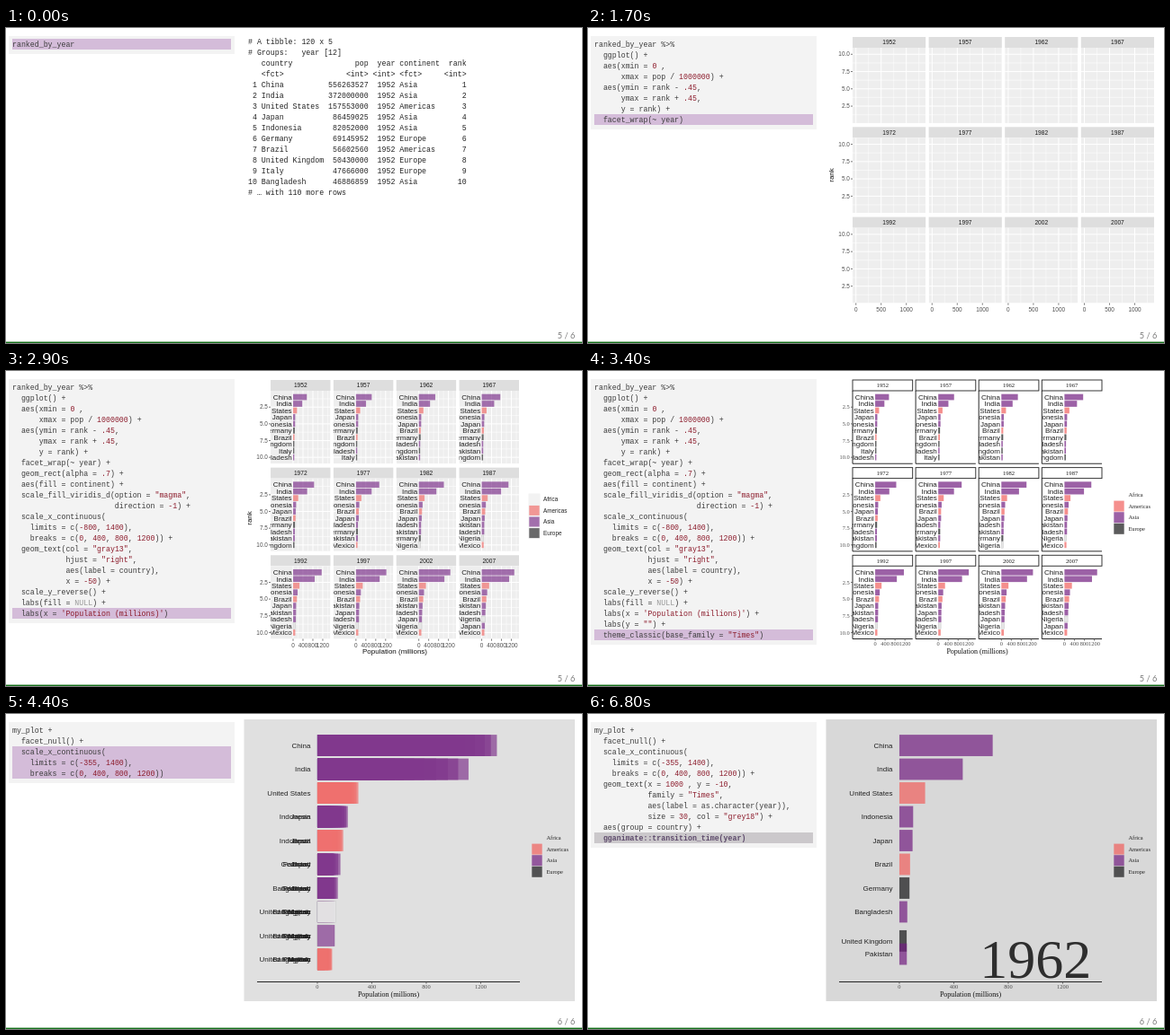
Write an HTML page that moves like this. It is 640 px wide and 351 px high and loops after 6900 ms.

```html
<!DOCTYPE html>
<html lang="en">
<head>
<meta charset="utf-8">
<title>Racing bar chart, step by step</title>
<style>
  html, body { margin: 0; width: 100%; height: 100%; overflow: hidden; background: #fff; }
  #stage { display: block; width: 640px; height: 351px; }
  text { white-space: pre; }
  .code { font: 8.25px "Liberation Mono", "DejaVu Sans Mono", monospace; fill: #3c3c3c; }
  .slide { font-family: Lato, "Open Sans", sans-serif; }
  .sans { font-family: "Liberation Sans", Arial, sans-serif; }
  .serif { font-family: "Liberation Serif", Times, serif; }
</style>
</head>
<body>
<svg id="stage" viewBox="0 0 640 351"></svg>
<script>
const LOOP = 6900, STEP = 100;

// Population in millions at the key years; straight lines in between.
const KEYS = [1952, 1957, 1962, 1967, 1977, 1987, 1997, 2007];
const COUNTRIES = [
  ['China', 'Asia', 556.3, 637.4, 665.8, 754.6, 943.5, 1084, 1230, 1318.7],
  ['India', 'Asia', 372, 409, 454, 506, 634, 788, 959, 1110.4],
  ['United States', 'Americas', 157.6, 172, 186.5, 198.7, 220.2, 242.8, 272.9, 301.1],
  ['Japan', 'Asia', 86.5, 91.6, 95.8, 100.8, 113.9, 122.1, 126, 127.5],
  ['Indonesia', 'Asia', 82.1, 90.1, 99, 109.3, 136.7, 169.3, 199.3, 223.5],
  ['Germany', 'Europe', 69.1, 71, 73.7, 76.4, 78.2, 77.7, 82, 82.4],
  ['Brazil', 'Americas', 56.6, 65.6, 76, 88, 114.3, 142.9, 168.5, 190],
  ['United Kingdom', 'Europe', 50.43, 51.43, 53.3, 55, 57.2, 57.3, 58.8, 60.8],
  ['Italy', 'Europe', 47.67, 49.2, 50.8, 52.7, 56.1, 56.7, 57.5, 58.1],
  ['Bangladesh', 'Asia', 46.89, 51.37, 56.8, 62.8, 80.4, 103.8, 123.3, 150.4],
  ['Pakistan', 'Asia', 41.3, 46.7, 53.1, 60.6, 78.15, 105.2, 135.6, 169.3],
  ['Nigeria', 'Africa', 33.1, 37.2, 41.9, 47.3, 62.2, 81.8, 106.2, 135],
  ['Mexico', 'Americas', 30.1, 35, 41.1, 48, 63.8, 80.1, 95.9, 108.7]
].map(([name, area, ...pops]) => ({ name, area, pops }));
const YEARS = Array.from({ length: 12 }, (_, i) => 1952 + 5 * i);
const MAGMA = { Africa: '#e6e6e6', Americas: '#f1605d', Asia: '#721f81', Europe: '#161618' };
const HUES = { Africa: '#f8766d', Americas: '#7cae00', Asia: '#00bfc4', Europe: '#c77cff' };
const AREAS = Object.keys(MAGMA);

const lerp = (a, b, f) => a + (b - a) * f;

function popAt(c, year) {
  let i = 0;
  while (i < KEYS.length - 2 && year > KEYS[i + 1]) i++;
  return lerp(c.pops[i], c.pops[i + 1], (year - KEYS[i]) / (KEYS[i + 1] - KEYS[i]));
}

const topTen = year => COUNTRIES
  .map(c => ({ name: c.name, area: c.area, pop: popAt(c, year) }))
  .sort((a, b) => b.pop - a.pop).slice(0, 10)
  .map((row, i) => ({ ...row, rank: i + 1 }));
const ALL_ROWS = YEARS.flatMap(topTen);

// Rows between two surveyed years; only countries ranked in both survive.
function tween(year) {
  const n = Math.floor((year - 1952) / 5 + 1e-6), f = (year - 1952) / 5 - n;
  const from = topTen(YEARS[n]);
  if (f < 1e-4) return from;
  const to = topTen(YEARS[n + 1]);
  return from.flatMap(a => {
    const b = to.find(r => r.name === a.name);
    return b ? [{ ...a, pop: lerp(a.pop, b.pop, f), rank: lerp(a.rank, b.rank, f) }] : [];
  });
}

// SVG helpers
const esc = s => String(s).replace(/&/g, '&amp;').replace(/</g, '&lt;').replace(/>/g, '&gt;');
const rect = (x, y, w, h, fill, more = '') =>
  `<rect x="${x}" y="${y}" width="${w}" height="${h}" fill="${fill}" ${more}/>`;
const line = (x1, y1, x2, y2, color, w) =>
  `<path d="M${x1} ${y1}L${x2} ${y2}" stroke="${color}" stroke-width="${w}"/>`;
const text = (x, y, s, cls, size, fill = '#222', anchor = 'start', more = '') =>
  `<text x="${x}" y="${y}" class="${cls}" font-size="${size}" fill="${fill}" text-anchor="${anchor}" ${more}>${esc(s)}</text>`;
const codeText = (x, y, inner, style = '') =>
  `<text x="${x}" y="${y}" class="code" style="${style}">${inner}</text>`;

function paint(src) {
  const token = /("[^"]*"|'[^']*')|(NULL)|((?<![\w.])-?\.?\d[\d.]*)/g;
  let out = '', last = 0;
  for (const m of src.matchAll(token)) {
    out += esc(src.slice(last, m.index)) +
      `<tspan fill="${m[2] ? '#999' : '#8c1c2c'}">${esc(m[0])}</tspan>`;
    last = m.index + m[0].length;
  }
  return out + esc(src.slice(last));
}

function codeBox(pieces, n, firstJoin, muted) {
  const rows = pieces.slice(0, n).flatMap((p, i) => {
    const lines = p[1].split('\n');
    if (i < n - 1) lines[lines.length - 1] += i ? ' +' : firstJoin;
    return lines.map(s => ({ s, hot: i === n - 1 }));
  });
  let out = rect(3, 9, 251, rows.length * 12 + 8, '#f3f3f3');
  rows.forEach(({ s, hot }, i) => {
    if (hot) out += rect(7, 12 + i * 12, 243, 12, muted ? '#cbc8cb' : '#d4bcd9');
    const bold = hot && muted;
    out += codeText(7, 21 + i * 12, bold ? esc(s) : paint(s), bold ? 'font-weight:bold;fill:#5d4a6b' : '');
  });
  return out;
}

const count = (pieces, t) => pieces.filter(p => p[0] <= t).length;

// Each piece: the time it appears and its code.
const BUILD = [
  [0, 'ranked_by_year'],
  [1200, '  ggplot()'],
  [1300, '  aes(xmin = 0 ,\n      xmax = pop / 1000000)'],
  [1500, '  aes(ymin = rank - .45,\n      ymax = rank + .45,\n      y = rank)'],
  [1700, '  facet_wrap(~ year)'],
  [2000, '  geom_rect(alpha = .7)'],
  [2100, '  aes(fill = continent)'],
  [2200, '  scale_fill_viridis_d(option = "magma",\n                       direction = -1)'],
  [2400, '  scale_x_continuous(\n    limits = c(-800, 1400),\n    breaks = c(0, 400, 800, 1200))'],
  [2600, '  geom_text(col = "gray13",\n            hjust = "right",\n            aes(label = country),\n            x = -50)'],
  [2700, '  scale_y_reverse()'],
  [2800, '  labs(fill = NULL)'],
  [2900, "  labs(x = 'Population (millions)')"],
  [3000, '  labs(y = "")'],
  [3400, '  theme_classic(base_family = "Times")'],
  [3500, '  theme(axis.text.y = element_blank())'],
  [3600, '  theme(axis.ticks.y = element_blank())'],
  [3700, '  theme(axis.line.y = element_blank())'],
  [3800, '  theme(rect = element_rect("gainsboro")) ->']
];
const ANIMATE = [
  [4200, 'my_plot'],
  [4300, '  facet_null()'],
  [4400, '  scale_x_continuous(\n    limits = c(-355, 1400),\n    breaks = c(0, 400, 800, 1200))'],
  [4500, '  geom_text(x = 1000 , y = -10,\n            family = "Times",\n            aes(label = as.character(year)),\n            size = 30, col = "grey18")'],
  [4600, '  aes(group = country)'],
  [4800, '  gganimate::transition_time(year)']
];

function table() {
  const pops = [556263527, 372000000, 157553000, 86459025, 82052000, 69145952, 56602560, 50430000, 47666000, 46886859];
  const row = (i, name, pop, year, area, rank) => String(i).padStart(2) + ' ' + name.padEnd(14) +
    String(pop).padStart(10) + String(year).padStart(6) + ' ' + area.padEnd(9) + String(rank).padStart(6);
  const lines = ['# A tibble: 120 x 5', '# Groups:   year [12]',
    row('', 'country', 'pop', 'year', 'continent', 'rank'),
    row('', '<fct>', '<int>', '<int>', '<fct>', '<int>'),
    ...topTen(1952).map((r, i) => row(i + 1, r.name, pops[i], 1952, r.area, i + 1)),
    '# … with 110 more rows'];
  return lines.map((s, i) => codeText(269, 17.8 + i * 12, esc(s), 'fill:#222')).join('');
}

function legend(o) {
  const x = o.classic ? 584 : 580.5, y = o.classic ? 131.7 : 136.5;
  const size = o.classic ? 12 : 13, inset = o.classic ? .3 : .8;
  let out = o.legendTitle ? text(x, y - 4, 'continent', o.font, 7.5) : '';
  AREAS.forEach((a, i) => {
    const top = y + i * 12.6;
    if (!o.classic) out += rect(x, top, size, 12.6, '#f2f2f2');
    if (a !== 'Africa' || o.colors === HUES)
      out += rect(x + inset, top + inset, size - 2 * inset, 12.6 - 2 * inset, o.colors[a], `opacity="${o.alpha}"`);
    out += text(x + 16.4, top + 8.5, a, o.font, 6.4);
  });
  return out;
}

function panel(x, y, w, h, rows, o) {
  const X = v => (v - o.lo) / (o.hi - o.lo) * w;
  const Y = r => (o.reverse ? r - .055 : 10.945 - r) / 10.89 * h;
  let out = o.classic ? '' : rect(0, 0, w, h, '#eee');
  if (!o.classic) {
    const xStep = o.breaks[1] / 2;
    if (o.xAxis) for (let v = 0; v < o.hi; v += xStep)
      out += line(X(v), 0, X(v), h, '#fff', v % (2 * xStep) ? .5 : 1);
    if (o.yAxis) for (let v = 1.25; v < 10.9; v += 1.25)
      out += line(0, Y(v), w, Y(v), '#fff', v % 2.5 ? .5 : 1);
  }
  if (o.bars) out += `<g opacity="${o.piled ? .87 : 1}">` + rows.map(r => {
    const pale = r.area === 'Africa' && o.colors === MAGMA;
    return rect(X(0), Y(r.rank) - .45 / 10.89 * h, X(r.pop) - X(0), .9 / 10.89 * h,
      o.colors ? o.colors[r.area] : '#595959',
      pale ? 'opacity=".97" stroke="#c4c4c4" stroke-width=".5"' : `opacity="${o.alpha}"`);
  }).join('') + '</g>';
  if (o.labels) {
    const labels = rows.map(r => text(X(-50), Y(r.rank) + 2.8, r.name, 'sans', 8, '#212121', 'end'));
    out += [...new Set(labels)].join('');
  }
  (o.stamps || []).forEach(s => {
    out += text(X(1000), Y(10) + 20.8, s, 'serif', 62, '#2e2e2e', 'middle');
  });
  out = `<svg x="${x}" y="${y}" width="${w}" height="${h}">${out}</svg>`;

  if (o.classic) out += line(x, y + h, x + w, y + h, '#111', .9);
  if (o.classic && o.yLine) out += line(x, y, x, y + h, '#111', .9);
  if (o.xAxis && o.bottomRow) o.breaks.forEach(v => {
    out += line(x + X(v), y + h, x + X(v), y + h + 2.2, '#444', .7) +
      text(x + X(v), y + h + (o.classic ? 7.6 : 9), v, o.font, 6.4, '#4d4d4d', 'middle');
  });
  if (o.yAxis && o.firstCol) [2.5, 5, 7.5, 10].forEach(v => {
    if (o.yTicks) out += line(x - 2, y + Y(v), x, y + Y(v), '#444', .7);
    if (o.yText) out += text(x - 3.2, y + Y(v) + 2.2, v.toFixed(1), o.font, 6.4, '#4d4d4d', 'end');
  });
  return out;
}

function plot(o) {
  const { left, right, bottom } = o, top = 10;
  let out = o.ground ? rect(264.5, 6, 367.5, 314, o.ground) : '';
  if (o.facets) {
    const gap = 3.4, strip = 12;
    const w = (right - left - 3 * gap) / 4, h = (bottom - top - 3 * strip - 2 * 4.4) / 3;
    YEARS.forEach((year, i) => {
      const col = i % 4, row = Math.floor(i / 4);
      const x = left + col * (w + gap), y = top + row * (h + strip + 4.4);
      out += rect(x, y, w, strip, o.classic ? o.ground || '#fff' : '#dedede',
        o.classic ? 'stroke="#222" stroke-width=".9"' : '');
      out += text(x + w / 2, y + 8.3, year, o.font, 6.6, '#1a1a1a', 'middle');
      out += panel(x, y + strip, w, h, topTen(year), { ...o, firstCol: !col, bottomRow: row === 2 });
    });
  } else {
    out += panel(left, top, right - left, bottom - top, o.rows || [], { ...o, firstCol: true, bottomRow: true });
  }
  if (o.colors) out += legend(o);
  if (o.xTitle) out += text((left + right) / 2, 315, 'Population (millions)', o.font, 8, '#111', 'middle');
  if (o.yTitle) out += text(0, 0, 'rank', o.font, 8, '#111', 'middle', 'transform="translate(273 164) rotate(-90)"');
  return out;
}

function buildPlot(n) {
  const wide = n >= 9, classic = n >= 15;
  return plot({
    left: n < 4 ? 276 : n < 16 ? 294 : 279, right: n < 7 ? 629 : classic ? 571 : 570,
    bottom: n < 13 ? 306.5 : 298.5,
    lo: wide ? -910 : -66, hi: wide ? 1510 : 1384,
    breaks: wide ? [0, 400, 800, 1200] : [0, 500, 1000],
    facets: n >= 5, xAxis: n >= 3, yAxis: n >= 4, yTitle: n >= 4 && n < 14,
    bars: n >= 6, colors: n < 7 ? null : n < 8 ? HUES : MAGMA, legendTitle: n < 12,
    labels: n >= 10, reverse: n >= 11, xTitle: n >= 13,
    classic, font: classic ? 'serif' : 'sans', alpha: classic ? .7 : .62,
    yText: n < 16, yTicks: n < 17, yLine: n < 18, ground: n >= 19 ? '#e0e0e0' : ''
  });
}

function animatePlot(n, t) {
  if (n < 2) return buildPlot(BUILD.length);
  const moving = n >= 6, year = 1952 + (t - 4800) / STEP * 5 / 9;
  const label = 1952 + 5 * Math.round((year - 1952) / 5);
  return plot({
    left: 279, right: 571, bottom: 298.5,
    lo: n < 3 ? -910 : -442.75, hi: n < 3 ? 1510 : 1487.75, breaks: [0, 400, 800, 1200],
    xAxis: true, xTitle: true, bars: true, labels: true, reverse: true,
    colors: MAGMA, classic: true, font: 'serif', alpha: .7,
    ground: moving ? '#d8d8d8' : '#e0e0e0', piled: !moving,
    rows: moving ? tween(year) : ALL_ROWS,
    stamps: moving ? [label] : n >= 4 ? YEARS : []
  });
}

const titleSlide = () =>
  text(42.5, 31, 'Now set up the animation', 'slide', 19.6, '#000', 'start', 'font-weight="bold"') +
  text(53.5, 57, 'Next we add the animation statement, which uses a function from the gganimate package.', 'slide', 7.2, '#000', 'start', 'font-weight="bold"') +
  rect(45, 73.5, 551, 31.5, '#f3f3f3') +
  codeText(49.5, 86, '<tspan font-weight="bold">library</tspan>(gganimate)') +
  codeText(49.5, 98, '# options(gganimate.nframes = 20)', 'fill:#8c8c8c');

function scene(t) {
  let out, n;
  if (t < 4100) {
    n = count(BUILD, t);
    out = codeBox(BUILD, n, ' %>%') + (n < 2 ? table() : buildPlot(n));
  } else if (t < 4200) {
    out = titleSlide();
  } else {
    n = count(ANIMATE, t);
    out = codeBox(ANIMATE, n, ' +', n === ANIMATE.length) + animatePlot(n, t);
  }
  return rect(0, 0, 640, 351, '#fff') + out +
    text(632.3, 346, t < 4100 ? '5 / 6' : '6 / 6', 'slide', 9.2, '#777', 'end') +
    rect(0, 349.6, 640, 1.4, '#14701a');
}

const stage = document.getElementById('stage');
let shown = -1;
function tick() {
  const t = Math.floor(performance.now() % LOOP / STEP) * STEP;
  if (t !== shown) {
    shown = t;
    stage.innerHTML = scene(t);
  }
  requestAnimationFrame(tick);
}
tick();
</script>
</body>
</html>
```
